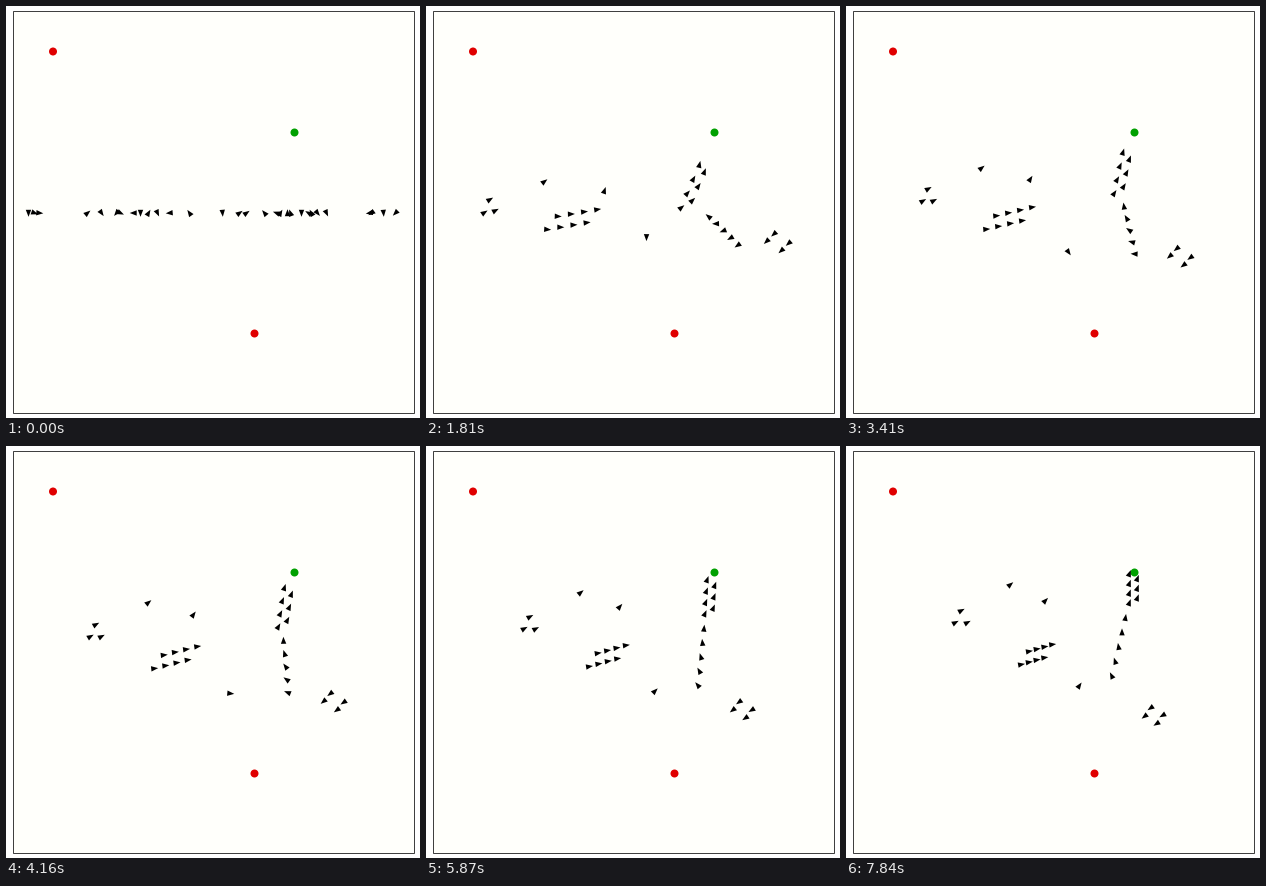
These frames come from a looping animation (414 by 412 pixels, 8000 ms). A matplotlib script:

```python
import numpy as np
import matplotlib.pyplot as plt
from matplotlib.animation import FuncAnimation
from matplotlib.collections import PolyCollection
from matplotlib.patches import Circle, Rectangle

W, H, DPI = 414, 412, 64
LOOP, STEP = 8000, 50
PX = 72 / DPI
START_Y = 206.5
SPEED = 100      # path length per unit of progress
SLOWDOWN = 4000  # ms, decay time of the common speed
EPS = 1e-3


def progress(ms):
    """Distance covered so far: everyone slows down exponentially."""
    return 1 - np.exp(-ms / SLOWDOWN)


KEYS = progress(np.array([1810, 4160, 7840]))
JOIN = KEYS[0]


class Flock:
    """Boids leave the start line and curve into a zigzag column.

    start: (x, heading in degrees) of each boid
    first, last: key points passed by the two ends of the column
    zig: sideways offset, alternating from boid to boid
    """

    def __init__(self, start, first, last=None, zig=(0, 0)):
        x, deg = np.array(start, float).T
        angle = np.radians(deg)
        self.home = np.stack([x, np.full_like(x, START_Y)], axis=1)
        self.launch = SPEED * np.stack([np.cos(angle), -np.sin(angle)], axis=1)
        self.first = np.polyfit(KEYS, first, 2)
        self.last = np.polyfit(KEYS, last or first, 2)
        self.rank = np.linspace(0, 1, len(x))[:, None]
        self.zig = np.where(np.arange(len(x)) % 2, -1, 1)[:, None] * np.array(zig)

    def column(self, s):
        powers = np.array([s * s, s, 1])
        head, tail = powers @ self.first, powers @ self.last
        return head + (tail - head) * self.rank + self.zig

    def at(self, s):
        if s >= JOIN:
            return self.column(s)
        u = s / JOIN
        goal = self.column(JOIN)
        arrive = (self.column(JOIN + EPS) - goal) / EPS
        ease = u * u * (3 - 2 * u)
        return (self.home + (goal - self.home) * ease
                + JOIN * u * (1 - u) * ((1 - u) * self.launch - u * arrive))


FLOCKS = [
    Flock([(22, -90), (33, -5), (28, -20)], zig=(0, 6),
          first=[(58, 200), (84, 184), (109, 170)],
          last=[(69, 198), (95, 184), (121, 170)]),
    Flock([(81, 40), (183, 125)],
          first=[(118, 175), (142, 156), (164, 138)],
          last=[(178, 184), (187, 168), (199, 154)]),
    Flock([(216, -85)],
          first=[(220, 231), (224, 247), (233, 239)]),
    Flock([(95, -55), (127, 180), (110, 230), (134, -90),
           (114, -25), (151, -65), (163, 185), (142, 60)], zig=(-2, 6),
          first=[(123, 217), (150, 216), (177, 212)],
          last=[(169, 209), (189, 206), (204, 204)]),
    Flock([(274, 60), (281, 90), (240, 35), (284, 110),
           (233, 35), (270, 160), (258, 130)], zig=(-4, 0),
          first=[(277, 158), (282, 141), (287, 127)],
          last=[(259, 201), (276, 180), (287, 156)]),
    Flock([(295, -90), (302, 150), (305, 120), (311, -50), (320, -65)],
          first=[(282, 210), (277, 194), (279, 171)],
          last=[(311, 239), (281, 246), (265, 229)]),
    Flock([(363, 190), (377, -85), (365, 215), (389, 225)], zig=(0, 6),
          first=[(340, 229), (317, 249), (298, 264)],
          last=[(362, 243), (337, 262), (316, 275)]),
]


def triangles(ms):
    s = progress(ms)
    pos = np.concatenate([f.at(s) for f in FLOCKS])
    ahead = np.concatenate([f.at(s + EPS) for f in FLOCKS]) - pos
    ahead /= np.hypot(*ahead.T)[:, None] + 1e-9
    side = np.stack([-ahead[:, 1], ahead[:, 0]], axis=1)
    tip = pos + 3.8 * ahead
    tail = pos - 3.2 * ahead
    return np.stack([tip, tail + 2.7 * side, tail - 2.7 * side], axis=1) + 0.5


fig = plt.figure(figsize=(W / DPI, H / DPI), dpi=DPI, facecolor="white")
ax = fig.add_axes([0, 0, 1, 1])
ax.set_xlim(0, W)
ax.set_ylim(H, 0)
ax.axis("off")

ax.add_patch(Rectangle((7, 5), 401, 402, facecolor="#fffffb",
                       edgecolor="#404040", lw=PX))
for x, y, color in ((47, 45.5, "#e00000"), (248.5, 327.5, "#e00000"),
                    (288.5, 126.5, "#00a000")):
    ax.add_patch(Circle((x, y), 4, color=color, lw=0))

boids = PolyCollection(triangles(0), facecolor="black", edgecolor="none", zorder=3)
ax.add_collection(boids, autolim=False)


def update(i):
    boids.set_verts(triangles(i * STEP))
    return [boids]


anim = FuncAnimation(fig, update, frames=LOOP // STEP, interval=STEP,
                     repeat=True, repeat_delay=0, blit=False)
plt.show()
```
